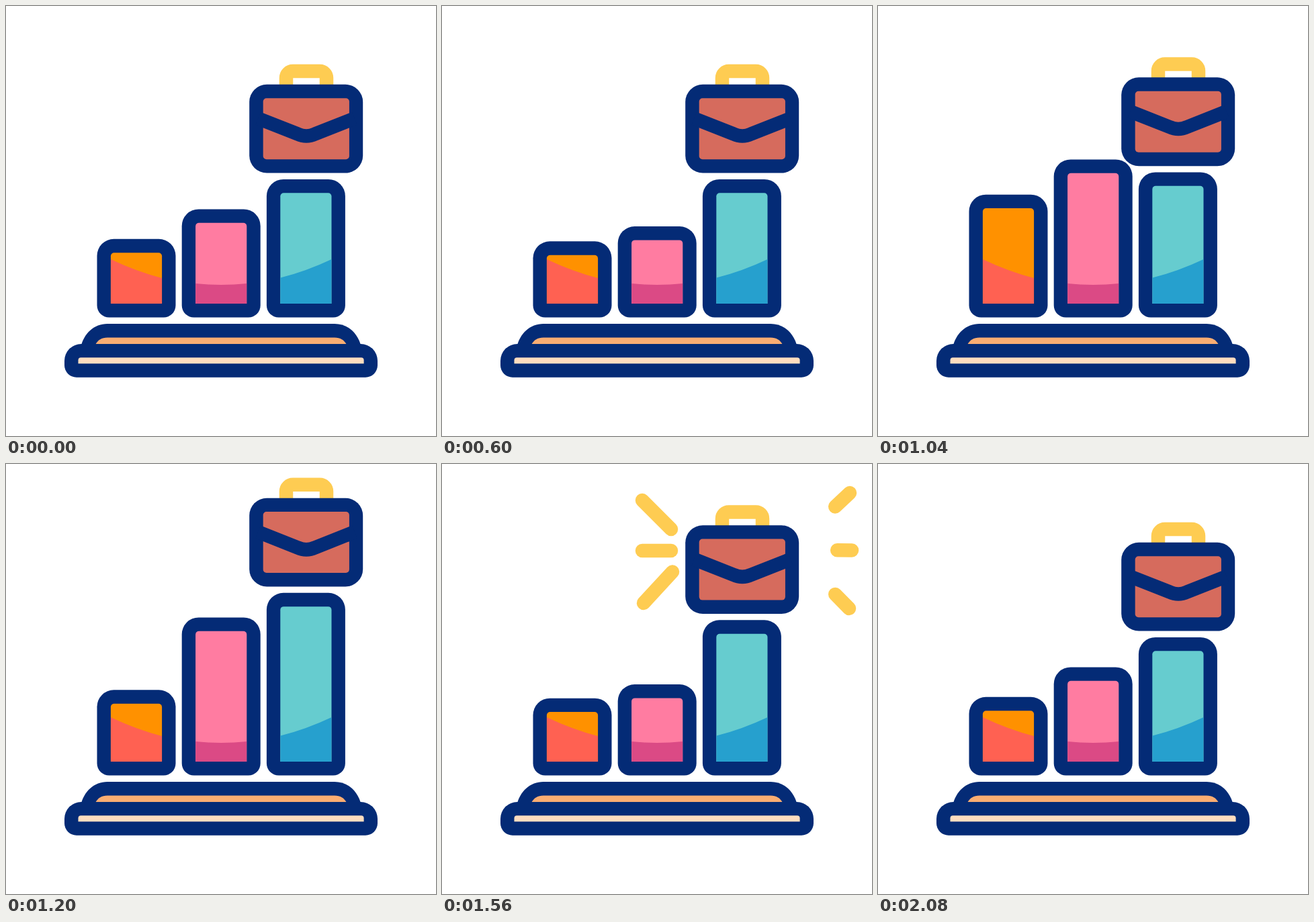
Recreate the animation shown at these times as an HTML page. Size 640 by 640 pixels, loop 2400 ms.

```html
<!DOCTYPE html>
<html lang="en">
<head>
<meta charset="utf-8">
<title>Growing bars</title>
<style>
html, body { margin: 0; width: 100%; height: 100%; overflow: hidden; background: #fff; }
svg { display: block; width: 100vw; height: 100vh; }
</style>
</head>
<body>
<svg viewBox="0 0 640 640">
  <defs id="defs"></defs>
  <path fill="#042b76" d="M111 508C116 487 131 473 151 473H489C509 473 524 487 529 508Z"/>
  <path fill="#faad72" d="M133 504C137 497 142 493.5 151 493.5H489C498 493.5 503 497 507 504Z"/>
  <path id="tray" fill="#042b76"/>
  <path id="trayIn" fill="#ffddbf"/>
  <g id="bars"></g>
  <g id="rays" fill="none" stroke="#fecc52" stroke-width="20.5" stroke-linecap="round"></g>
  <g id="case">
    <path d="M417 128V107a10 10 0 0 1 10-10h40a10 10 0 0 1 10 10V128" fill="none" stroke="#fecc52" stroke-width="20.5"/>
    <rect x="362.2" y="116.8" width="169" height="131.8" rx="26" fill="#042b76"/>
    <rect x="382.7" y="137.2" width="128.2" height="91" rx="5" fill="#d66b5d"/>
    <path d="M375 167.2L434 190.5Q447 196.5 460 190.5L519 167.2" fill="none" stroke="#042b76" stroke-width="20.5"/>
  </g>
</svg>
<script>
const NS = 'http://www.w3.org/2000/svg';
const LOOP = 2400, STEP = 40, FLOOR = 463.5, LINE = 20.4;
const DIP = 25.6, PEAK = -76.8;

// time after a bar's start, offset of its top edge
const KEYS = [[0, 0], [200, DIP], [280, DIP], [680, PEAK], [760, PEAK], [1160, DIP], [1400, 0]];

const BARS = [
  { x: 135.5, top: 346.8, delay: 200, back: '#ff9100', front: '#ff6152', wave: [377, 395, 405] },
  { x: 261.7, top: 302.4, delay: 400, back: '#ff7ca1', front: '#db4a85', wave: [413, 417, 413] },
  { x: 387.9, top: 257.9, delay: 600, back: '#66cccf', front: '#26a0ce', wave: [404.5, 395, 377] }
];

// inner point, full reach, start time
const RAYS = [
  [545, 101, 62, -58, 1240], [548, 128, 62, 0.5, 1240], [547, 155, 59, 60, 1240],
  [346, 102, -48, -48, 1320], [346, 129, -48, 0, 1320], [348, 155, -48, 52, 1320]
];

const el = id => document.getElementById(id);

function add(parent, tag, attrs = {}) {
  const node = document.createElementNS(NS, tag);
  for (const k in attrs) node.setAttribute(k, attrs[k]);
  return parent.appendChild(node);
}

// box with separate radii for the top and bottom corners
function box(x1, y1, x2, y2, top, low) {
  const arc = (r, dx, dy) => `a${r} ${r} 0 0 1 ${dx * r} ${dy * r}`;
  return `M${x1} ${y1 + top}${arc(top, 1, -1)}H${x2 - top}${arc(top, 1, 1)}` +
    `V${y2 - low}${arc(low, -1, 1)}H${x1 + low}${arc(low, -1, -1)}Z`;
}

function ease(a, b, t) {
  const u = Math.min(1, Math.max(0, (t - a) / (b - a)));
  return u * u * (3 - 2 * u);
}

function shift(t) {
  let v = 0;
  for (let i = 1; i < KEYS.length; i++) {
    const [a, from] = KEYS[i - 1], [b, to] = KEYS[i];
    v += (to - from) * ease(a, b, t);
  }
  return v;
}

el('tray').setAttribute('d', box(87, 503, 553, 552.7, 25, 18));
el('trayIn').setAttribute('d', box(107.5, 523.3, 532.6, 532.3, 4, 0));

BARS.forEach((bar, i) => {
  const l = bar.x + LINE, r = bar.x + 117 - LINE, [a, b, c] = bar.wave;
  const clip = add(el('defs'), 'clipPath', { id: 'clip' + i });
  bar.hole = add(clip, 'path');
  bar.frame = add(el('bars'), 'path', { fill: '#042b76' });
  bar.fill = add(el('bars'), 'path', { fill: bar.back });
  add(el('bars'), 'path', {
    fill: bar.front,
    'clip-path': `url(#clip${i})`,
    d: `M${l} ${a}Q${(l + r) / 2} ${b} ${r} ${c}V${FLOOR}H${l}Z`
  });
});

const rays = RAYS.map(() => add(el('rays'), 'path'));

function draw(t) {
  for (const bar of BARS) {
    const y = bar.top + shift(t - bar.delay);
    const inner = box(bar.x + LINE, y + LINE, bar.x + 117 - LINE, FLOOR - LINE, 5, 0);
    bar.frame.setAttribute('d', box(bar.x, y, bar.x + 117, FLOOR, 25, 18));
    bar.fill.setAttribute('d', inner);
    bar.hole.setAttribute('d', inner);
  }
  el('case').setAttribute('transform', `translate(0 ${shift(t - BARS[2].delay)})`);

  RAYS.forEach(([x, y, dx, dy, start], i) => {
    const head = ease(start, start + 200, t), tail = ease(start + 200, start + 400, t);
    const at = k => `${x + dx * k} ${y + dy * k}`;
    rays[i].setAttribute('d', head > tail ? `M${at(tail)}L${at(head)}` : '');
  });
}

function tick() {
  const t = performance.now() % LOOP;
  draw(Math.floor(t / STEP) * STEP);
  requestAnimationFrame(tick);
}
tick();
</script>
</body>
</html>
```
